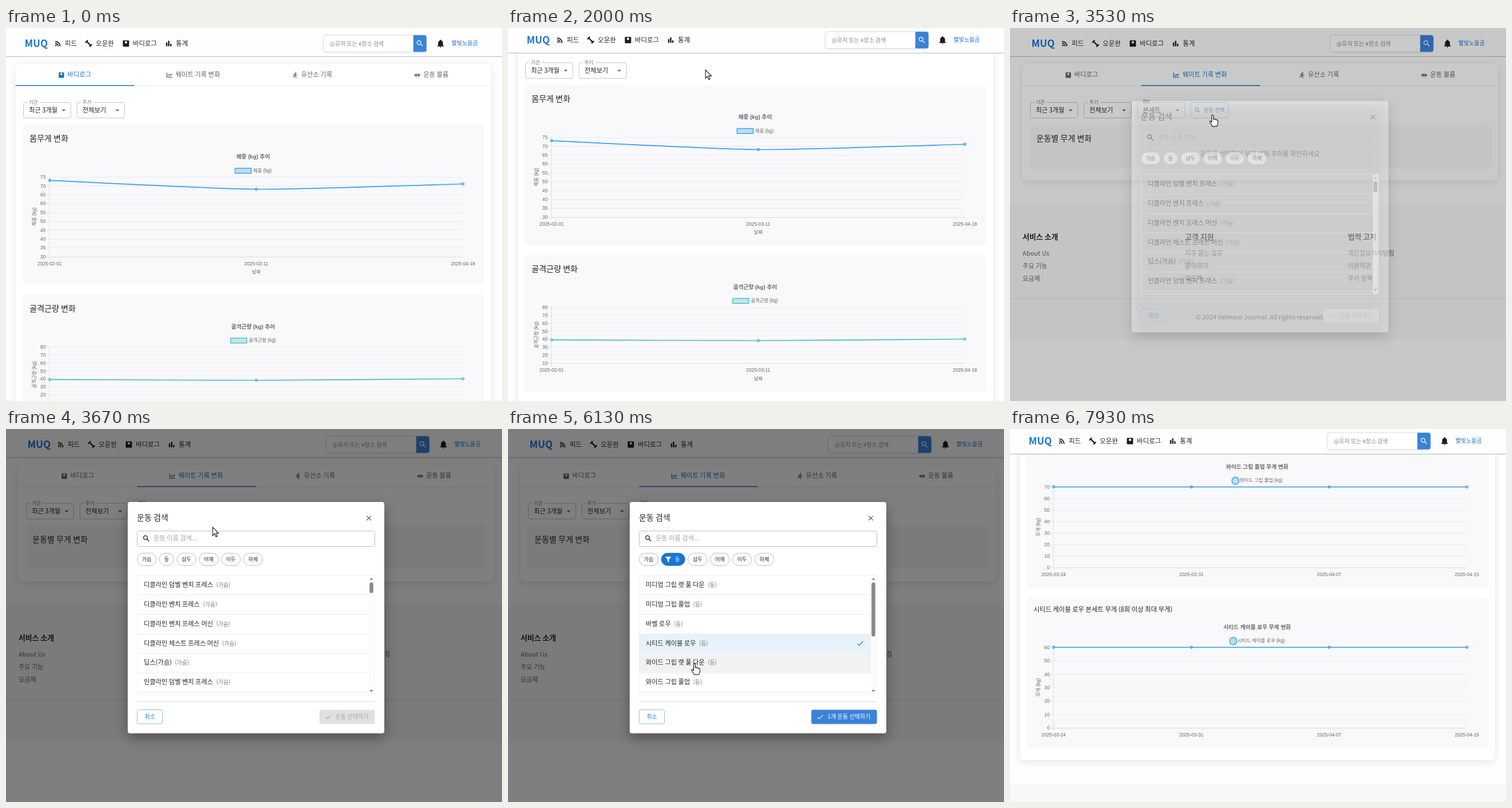
These frames come from a looping animation (864x649 px, 8000 ms). An HTML page with a canvas:

```html
<!DOCTYPE html>
<html lang="ko">
<head>
<meta charset="utf-8">
<title>운동 통계</title>
<style>
html, body { margin: 0; width: 100%; height: 100%; overflow: hidden; background: #fefefe; }
canvas { display: block; }
</style>
</head>
<body>
<canvas id="stage" width="864" height="649"></canvas>
<script>
const ctx = document.getElementById('stage').getContext('2d');
const W = 864, H = 649, LOOP = 8000;
const SANS = '"Noto Sans CJK KR", "Noto Sans CJK", "Noto Sans", sans-serif';
const CHART = '"Liberation Sans", "Noto Sans CJK KR", "Noto Sans CJK", sans-serif';
const INK = '#262626', GREY = '#666', BLUE = '#1976d2', BUTTON = '#3b82d8';

const ICONS = {
  search: 'M15.5 14h-.79l-.28-.27C15.41 12.59 16 11.11 16 9.5 16 5.91 13.09 3 9.5 3S3 5.91 3 9.5 5.91 16 9.5 16c1.61 0 3.09-.59 4.23-1.57l.27.28v.79l5 4.99L20.49 19l-4.99-5zm-6 0C7.01 14 5 11.99 5 9.5S7.01 5 9.5 5 14 7.01 14 9.5 11.99 14 9.5 14z',
  bell: 'M12 22c1.1 0 2-.9 2-2h-4c0 1.1.89 2 2 2zm6-6v-5c0-3.07-1.64-5.64-4.5-6.32V4c0-.83-.67-1.5-1.5-1.5s-1.5.67-1.5 1.5v.68C7.63 5.36 6 7.92 6 11v5l-2 2v1h16v-1l-2-2z',
  feed: 'M6.18 15.64a2.18 2.18 0 1 1 0 4.36 2.18 2.18 0 0 1 0-4.36zM4 4.44v2.83c7.03 0 12.73 5.7 12.73 12.73h2.83C19.56 11.41 12.59 4.44 4 4.44zm0 5.66v2.83c3.9 0 7.07 3.17 7.07 7.07h2.83c0-5.47-4.43-9.9-9.9-9.9z',
  scale: 'M19 3H5a2 2 0 0 0-2 2v14a2 2 0 0 0 2 2h14a2 2 0 0 0 2-2V5a2 2 0 0 0-2-2zM12 12a3.5 3.5 0 1 1 0-7 3.5 3.5 0 0 1 0 7z',
  bars: 'M4 9h4v11H4zm12 4h4v7h-4zm-6-9h4v16h-4z',
  run: 'M13.49 5.48c1.1 0 2-.9 2-2s-.9-2-2-2-2 .9-2 2 .9 2 2 2zm-3.6 13.9 1-4.4 2.1 2v6h2v-7.5l-2.1-2 .6-3c1.3 1.5 3.3 2.5 5.5 2.5v-2c-1.9 0-3.5-1-4.3-2.4l-1-1.6c-.4-.6-1-1-1.7-1-.3 0-.5.1-.8.1l-5.2 2.2v4.7h2v-3.4l1.8-.7-1.6 8.1-4.9-1-.4 2 7 1.4z',
  close: 'M19 6.41 17.59 5 12 10.59 6.41 5 5 6.41 10.59 12 5 17.59 6.41 19 12 13.41 17.59 19 19 17.59 13.41 12z',
  cancel: 'M12 2C6.47 2 2 6.47 2 12s4.47 10 10 10 10-4.47 10-10S17.53 2 12 2zm5 13.59L15.59 17 12 13.41 8.41 17 7 15.59 10.59 12 7 8.41 8.41 7 12 10.59 15.59 7 17 8.41 13.41 12 17 15.59z',
  check: 'M9 16.17 4.83 12l-1.42 1.41L9 19 21 7l-1.41-1.41z',
  filter: 'M3 4h18l-7 9v8l-4-3v-5z',
  down: 'M7 10l5 5 5-5z',
  up: 'M7 14l5-5 5 5z'
};
const LINE_ICONS = {
  trend: 'M3 4v15h18M7 15l4-5 4 3 5-6',
  barbell: 'M2 12h20M5 8v8M9 6v12M15 6v12M19 8v8',
  dumbbell: 'M6 6l12 12M2.5 9.5l7-7M14.5 21.5l7-7'
};
const ARROW = new Path2D('M0 0V14.5L3.4 11.3 5.8 16.6 8 15.6 5.7 10.4H10.2Z');
const HAND = new Path2D('M-1.6 1.2C-1.6-.6 1.4-.6 1.4 1.2V7.2C2.2 6.2 4 6.6 4.2 7.8 5 7 6.6 7.4 6.8 8.6 7.8 8 9.2 8.6 9.2 10V13.5C9.2 16 7.8 17 7.6 19.5H-.8C-1.4 16.8-3.6 15-5 12.2-5.8 10.6-3.8 9.6-2.8 10.8L-1.6 12.2Z');

const clamp = v => Math.min(1, Math.max(0, v));
const smooth = v => v * v * (3 - 2 * v);
const progress = (t, start, length) => clamp((t - start) / length);
const within = (t, [start, end]) => t >= start && t < end;

// Keys are [time, ...values]; returns the eased values at time t.
function track(keys, t) {
  let i = keys.findIndex(k => k[0] > t);
  if (i < 0) i = keys.length;
  const a = keys[Math.max(0, i - 1)], b = keys[Math.min(i, keys.length - 1)];
  const p = a === b ? 0 : smooth((t - a[0]) / (b[0] - a[0]));
  return a.slice(1).map((v, k) => v + (b[k + 1] - v) * p);
}

// y is the visual middle of the text line.
function text(s, x, y, size = 11.2, color = INK, weight = 400, align = 'left', family = SANS) {
  ctx.font = `${weight} ${size}px ${family}`;
  ctx.fillStyle = color;
  ctx.textAlign = align;
  ctx.fillText(s, x, y + size * 0.37);
}

function icon(name, x, y, size, color) {
  ctx.save();
  ctx.translate(x - size / 2, y - size / 2);
  ctx.scale(size / 24, size / 24);
  ctx.fillStyle = ctx.strokeStyle = color;
  if (LINE_ICONS[name]) {
    ctx.lineWidth = name === 'dumbbell' ? 3.6 : 2.6;
    ctx.stroke(new Path2D(LINE_ICONS[name]));
  } else ctx.fill(new Path2D(ICONS[name]), 'evenodd');
  ctx.restore();
}

function rect(x, y, w, h, fill) {
  ctx.fillStyle = fill;
  ctx.fillRect(x, y, w, h);
}

function box(x, y, w, h, r, fill, stroke, shadow) {
  ctx.save();
  ctx.beginPath();
  ctx.roundRect(x, y, w, h, r);
  if (shadow) {
    ctx.shadowColor = `rgba(0,0,0,${shadow[0]})`;
    ctx.shadowBlur = shadow[1];
    ctx.shadowOffsetY = shadow[2];
  }
  if (fill) { ctx.fillStyle = fill; ctx.fill(); }
  ctx.shadowColor = 'transparent';
  if (stroke) { ctx.strokeStyle = stroke; ctx.lineWidth = 1; ctx.stroke(); }
  ctx.restore();
}

function circle(x, y, r, fill, stroke, width = 1.4) {
  ctx.beginPath();
  ctx.arc(x, y, r, 0, 7);
  ctx.fillStyle = fill;
  ctx.fill();
  if (stroke) { ctx.strokeStyle = stroke; ctx.lineWidth = width; ctx.stroke(); }
}

function header(dx, shift) {
  rect(0, 0, W, 49 - shift, '#fefefe');
  rect(0, 49 - shift, W, 1, '#c3c3c5');
  rect(0, 50 - shift, W, 1, 'rgba(0,0,0,.06)');
  ctx.save();
  ctx.translate(dx, -shift);
  text('MUQ', 32.5, 27, 17, BLUE, 700);
  [['feed', 90.5, '피드', 102.5], ['dumbbell', 144, '오운완', 156.5],
   ['scale', 209, '바디로그', 221], ['bars', 283.5, '통계', 296]].forEach(([name, ix, label, x]) => {
    icon(name, ix, 27, 14.5, '#1c1c1c');
    text(label, x, 26.3, 11.4, INK, 500);
  });
  box(553, 12.5, 179, 29, 4, '#fff', '#e0e0e2', [.12, 4, 1]);
  text('@유저 또는 #장소 검색', 564, 27, 9.9, '#8a8a8a');
  box(709.5, 12.5, 23, 29, [0, 4, 4, 0], BUTTON);
  icon('search', 721, 27, 15, '#fff');
  icon('bell', 757, 27, 17, '#1c1c1c');
  text('별빛노을곰', 776, 26.3, 10, BLUE, 500);
  ctx.restore();
}

const TABS = [['scale', 96.5, '바디로그', 107], ['trend', 285, '웨이트 기록 변화', 295.5],
              ['run', 504, '유산소 기록', 514], ['barbell', 716.5, '운동 볼륨', 727]];
const TAB_W = 207.2, tabX = i => 16.5 + TAB_W * i;

function tabs(t) {
  const active = t < 2700 ? 0 : 1;
  if (within(t, [2360, 2960])) {
    rect(tabX(1), 62.5, TAB_W, 38.5, '#e4f5fd');
    if (t > 2610) {
      ctx.save();
      ctx.beginPath();
      ctx.rect(tabX(1), 62.5, TAB_W, 38.5);
      ctx.clip();
      circle(321.5, 86, 12 + 100 * smooth(progress(t, 2610, 460)),
        `rgba(60,60,60,${.14 * (1 - progress(t, 2740, 220))})`);
      ctx.restore();
    }
  }
  rect(16.5, 100.5, 828.5, 1, '#ebebee');
  rect(tabX(smooth(progress(t, 2650, 300))), 99.3, TAB_W, 1.7, '#3d87d8');
  TABS.forEach(([name, ix, label, x], i) => {
    const color = i === active ? BLUE : GREY;
    icon(name, ix, 82, 12.5, color);
    text(label, x, 81.3, 11.25, color, 500);
  });
}

function select(x, label, value) {
  box(x, 129.5, 82.5, 27, 3, null, '#c6c6c8');
  ctx.font = `400 8.4px ${SANS}`;
  rect(x + 6.5, 127, ctx.measureText(label).width + 6, 5, '#fff');
  text(label, x + 9.5, 129, 8.4, GREY);
  text(value, x + 9.5, 143, 11.2, INK);
  icon('down', x + 70, 143, 16.5, GREY);
}

function chart(c) {
  const { top, bottom, color, min, max, dot, grow = 1 } = c;
  const cardTop = top - (dot ? 86 : 90), cardEnd = bottom + (dot ? 33.5 : 48);
  const rgb = a => `rgba(${color},${a})`;
  const label = (s, x, y, align = 'center') => text(s, x, y, 8.3, GREY, 400, align, CHART);
  const py = v => bottom - (v - min) / (max - min) * (bottom - top);

  box(29, cardTop, 804, cardEnd - cardTop, 6, '#f9f8fa', null, [.03, 4, 1]);
  text(c.heading, 41, top - (dot ? 65.6 : 67), dot ? 11.3 : 14, INK, 500);
  text(c.title, 430.5, top - 35.3, 9.66, GREY, 700, 'center', CHART);

  ctx.font = `400 8.3px ${CHART}`;
  const mark = dot ? 14 : 32;
  const left = 430.5 - (mark + ctx.measureText(c.legend).width) / 2;
  if (dot) circle(left + 6.5, top - 10.6, 6.2, rgb(.32), rgb(1));
  else {
    ctx.lineWidth = 1.4;
    ctx.strokeStyle = rgb(1);
    rect(left + .5, top - 15, 28, 8.6, rgb(.32));
    ctx.strokeRect(left + .5, top - 15, 28, 8.6);
  }
  label(c.legend, left + mark, top - 11.3, 'left');

  for (let v = min; v <= max; v += c.step) {
    rect(70, Math.round(py(v)), 726, 1, v === min ? '#dcdcde' : '#eceaed');
    label(v, 69, py(v) + .2, 'right');
  }
  rect(75, top, 1, bottom - top + 5, '#e0dfe2');

  const pts = c.values.map((v, i) =>
    [76 + 720 * i / (c.values.length - 1), bottom + (py(v) - bottom) * grow]);
  const at = i => pts[Math.min(pts.length - 1, Math.max(0, i))];
  const slope = i => [.1 * (at(i + 1)[0] - at(i - 1)[0]), .1 * (at(i + 1)[1] - at(i - 1)[1])];
  ctx.beginPath();
  ctx.moveTo(...pts[0]);
  for (let i = 1; i < pts.length; i++) {
    const a = slope(i - 1), b = slope(i), p = pts[i - 1], q = pts[i];
    ctx.bezierCurveTo(p[0] + a[0], p[1] + a[1], q[0] - b[0], q[1] - b[1], ...q);
  }
  ctx.strokeStyle = rgb(1);
  ctx.lineWidth = 1.6;
  ctx.stroke();
  pts.forEach(([x, y], i) => {
    circle(x, y, 2.3, rgb(.4), rgb(1), 1);
    label(c.dates[i], x, bottom + 12.3);
  });
  if (!dot) label('날짜', 436, bottom + 26.5);

  ctx.save();
  ctx.translate(48.5, (top + bottom) / 2);
  ctx.rotate(-Math.PI / 2);
  label(c.yTitle, 0, 0);
  ctx.restore();
}

function bodyChart(name, unit, top, bottom, color, min, max, step, values) {
  const series = `${name} (${unit})`;
  chart({ top, bottom, color, min, max, step, values, heading: (name === '체중' ? '몸무게' : name) + ' 변화',
    title: series + ' 추이', legend: series, yTitle: series, dates: ['2025-02-01', '2025-03-11', '2025-04-18'] });
}

function liftChart(name, top, max, grow) {
  chart({ top, bottom: top + 140.3, color: '54,162,235', min: 0, max, step: 10, values: Array(4).fill(max),
    grow, dot: true, heading: `${name} 본세트 무게 (8회 이상 최대 무게)`, title: `${name} 무게 변화`,
    legend: `${name} (kg)`, yTitle: '무게 (kg)',
    dates: ['2025-03-24', '2025-03-31', '2025-04-07', '2025-04-15'] });
}

function footer(y, dx) {
  rect(-dx, y, W, 237.5, '#f7f8f9');
  [[17, '서비스 소개', 'About Us', '주요 기능', '요금제'],
   [300, '고객 지원', '자주 묻는 질문', '문의하기', '피드백'],
   [583.5, '법적 고지', '개인정보처리방침', '이용약관', '쿠키 정책']].forEach(([x, title, ...items]) => {
    text(title, x, y + 57, 12.8, INK, 700);
    items.forEach((s, i) => text(s, x, y + 85.5 + 22 * i, 11, GREY));
  });
  rect(-dx, y + 164.5, W, 1, '#e3e4e7');
  text('© 2024 Velmoro Journal. All rights reserved.', 430.5, y + 197, 11, GREY, 400, 'center');
}

function liftChip(x, w, label) {
  box(x, 171, w, 21.5, 10.75, null, '#5a98dc');
  text(label, x + 8.5, 182, 9, BLUE);
  icon('cancel', x + w - 11.5, 181.8, 14.5, BUTTON);
}

function page(t, dx) {
  const onBody = t < 2640, charted = t >= 7070;
  const end = onBody ? 978 : charted ? 764 : 265;
  box(16.5, 62.5, 828.5, end - 62.5, 7, '#fff', null, [.11, 13, 3]);
  tabs(t);
  select(30.5, '기간', '최근 3개월');
  select(123.8, '주기', '전체보기');
  if (onBody) {
    bodyChart('체중', 'kg', 259, 397.5, '54,162,235', 30, 75, 5, [73, 68, 71]);
    bodyChart('골격근량', 'kg', 554.5, 652, '75,192,192', 10, 80, 10, [39, 38, 40]);
    bodyChart('체지방률', '%', 810.5, 908, '255,99,132', 10, 30, 5, [22, 19, 20]);
  } else {
    select(217, 'RM', '본세트');
    box(309.8, 129.5, 66, 27, 3, within(t, [3150, 3500]) ? '#f1f7fd' : null, '#8fbbe8');
    icon('search', 321.5, 143, 13, BLUE);
    text('운동 선택', 332.5, 142.5, 9.3, BLUE, 500);
    if (charted) {
      const grow = 1 - (1 - progress(t, 7086, 1000)) ** 4;
      liftChip(30.5, 101, '시티드 케이블 로우');
      liftChip(139, 92.5, '와이드 그립 풀업');
      liftChart('와이드 그립 풀업', 288.6, 70, grow);
      liftChart('시티드 케이블 로우', 567.6, 60, grow);
    } else {
      box(29, 169, 804, 74, 6, '#f9f8fa', null, [.03, 4, 1]);
      text('운동별 무게 변화', 41, 192, 14, INK, 500);
      text('운동을 선택하여 무게 변화 추이를 확인하세요', 430.5, 219.3, 11.2, GREY, 400, 'center');
    }
  }
  footer(end + 41, dx);
}

const PARTS = ['가슴', '등', '삼두', '어깨', '이두', '하체'];
const CHEST = ['디클라인 덤벨 벤치 프레스', '디클라인 벤치 프레스', '디클라인 벤치 프레스 머신',
  '디클라인 체스트 프레스 머신', '딥스(가슴)', '인클라인 덤벨 벤치 프레스'];
const BACK = ['미디엄 그립 랫 풀 다운', '미디엄 그립 풀업', '바벨 로우',
  '시티드 케이블 로우', '와이드 그립 랫 풀 다운', '와이드 그립 풀업'];
const ROW = 33.8;

function dialog(t, [cx, cy]) {
  const filtered = t >= 4380;
  const picked = [[6030, 3], [6400, 5]].filter(([at]) => t >= at).map(([, row]) => row);
  box(212, 127, 447, 402.5, 4, '#fff', null, [.35, 22, 8]);
  text('운동 검색', 228, 154.3, 14, INK, 500);
  icon('close', 632, 155, 15, GREY);
  box(228.5, 177.5, 414, 27, 3, null, '#bfbfc1');
  icon('search', 244.5, 190.5, 15, '#1c1c1c');
  text('운동 이름 검색...', 257, 190, 11.2, '#a5a5a5');

  let x = 228.5;
  PARTS.forEach((name, i) => {
    const on = filtered && i === 1;
    const w = on ? 41 : name.length > 1 ? 33.2 : 25;
    box(x, 216, w, 21.5, 10.75, on ? BLUE : '#fff', on ? BLUE : '#bdbdbf');
    if (on) icon('filter', x + 12, 227, 14, '#fff');
    text(name, on ? x + 28 : x + w / 2, 226.7, 9, on ? '#fff' : INK, 500, 'center');
    x += w + 5.5;
  });

  ctx.strokeStyle = '#f0f0f2';
  ctx.lineWidth = 1;
  ctx.strokeRect(228.5, 254.5, 413.5, 208);
  const hovered = cx > 229 && cx < 632 && cy < 457 ? Math.floor((cy - 254.5) / ROW) : -1;
  (filtered ? BACK : CHEST).forEach((name, i) => {
    const y = 254.5 + ROW * i;
    const on = picked.includes(i);
    if (on || hovered === i) rect(229, y, 403, ROW, on ? '#e8f2fa' : '#f3f2f3');
    rect(229, Math.round(y + ROW), 403, 1, '#ececee');
    text(name, 240, y + 16.5, 11.2, INK);
    const end = 240 + ctx.measureText(name).width;
    text(filtered ? '(등)' : '(가슴)', end + 5.5, y + 17, 9.75, '#777');
    if (on) icon('check', 613.5, y + 17.3, 14.5, BLUE);
  });
  rect(632, 255, 9.5, 207, '#fcfcfc');
  icon('up', 636.5, 261, 15, '#777');
  icon('down', 636.5, 455.5, 15, '#777');
  box(633.2, 267, 6.6, filtered ? 94 : 18.5, 3.3, '#8a8a8c');

  rect(228, 473.5, 414.5, 1.3, '#e0e0e2');
  box(228.5, 488.5, 44, 24.5, 3, null, '#8fbbe8');
  text('취소', 250.5, 500.3, 9.9, BLUE, 500, 'center');
  const left = picked.length ? 528.5 : 546;
  const ink = picked.length ? '#fff' : '#a8a8a8';
  box(left, 488.5, 642.5 - left, 24.5, 3, picked.length ? BUTTON : '#e0e0e0', null, picked.length && [.2, 3, 1]);
  icon('check', left + 15.5, 501, 14, ink);
  text((picked.length ? picked.length + '개 ' : '') + '운동 선택하기', 631.5, 500.3, 10.05, ink, 500, 'right');
}

const SCROLL = [[870, 0], [1450, 330], [1560, 330], [2000, 69], [2070, 69], [2300, 0], [7640, 0], [7930, 188]];
const CURSOR = [[1750, 352, 110], [2000, 344, 73], [2420, 323, 88], [2850, 323, 88], [3250, 350, 140],
  [3450, 350, 143], [3670, 360, 171], [4250, 282, 225], [4500, 282, 225], [5130, 300, 300], [5730, 328, 375],
  [6030, 328, 375], [6130, 325, 408], [6330, 325, 438], [6480, 325, 438], [6750, 595, 500], [6900, 595, 500],
  [7270, 645, 485]];
const HAND_TIMES = [[2300, 3000], [3150, 3560], [4050, 4600], [4850, 6560], [6680, 6960]];

function cursor(t, [x, y]) {
  if (!within(t, [1750, 7700])) return;
  const shape = HAND_TIMES.some(span => within(t, span)) ? HAND : ARROW;
  ctx.save();
  ctx.translate(x, y);
  ctx.fillStyle = '#fff';
  ctx.strokeStyle = '#222';
  ctx.lineWidth = 1.2;
  ctx.fill(shape);
  ctx.stroke(shape);
  ctx.restore();
}

function draw(t) {
  const [scroll] = track(SCROLL, t);
  const pointer = track(CURSOR, t);
  const dx = within(t, [2640, 7070]) ? 5 : 0;
  rect(0, 0, W, H, '#fefefe');
  ctx.save();
  ctx.translate(dx, -scroll);
  page(t, dx);
  ctx.restore();
  header(dx, Math.min(6, scroll));

  const shown = smooth(progress(t, 3430, 225)) * (1 - smooth(progress(t, 6870, 195)));
  if (shown > 0) {
    rect(0, 0, W, H, `rgba(0,0,0,${.5 * shown})`);
    ctx.save();
    ctx.globalAlpha = shown;
    dialog(t, pointer);
    ctx.restore();
  }
  cursor(t, pointer);
}

const start = performance.now();
(function tick() {
  draw((performance.now() - start) % LOOP);
  requestAnimationFrame(tick);
})();
</script>
</body>
</html>
```
